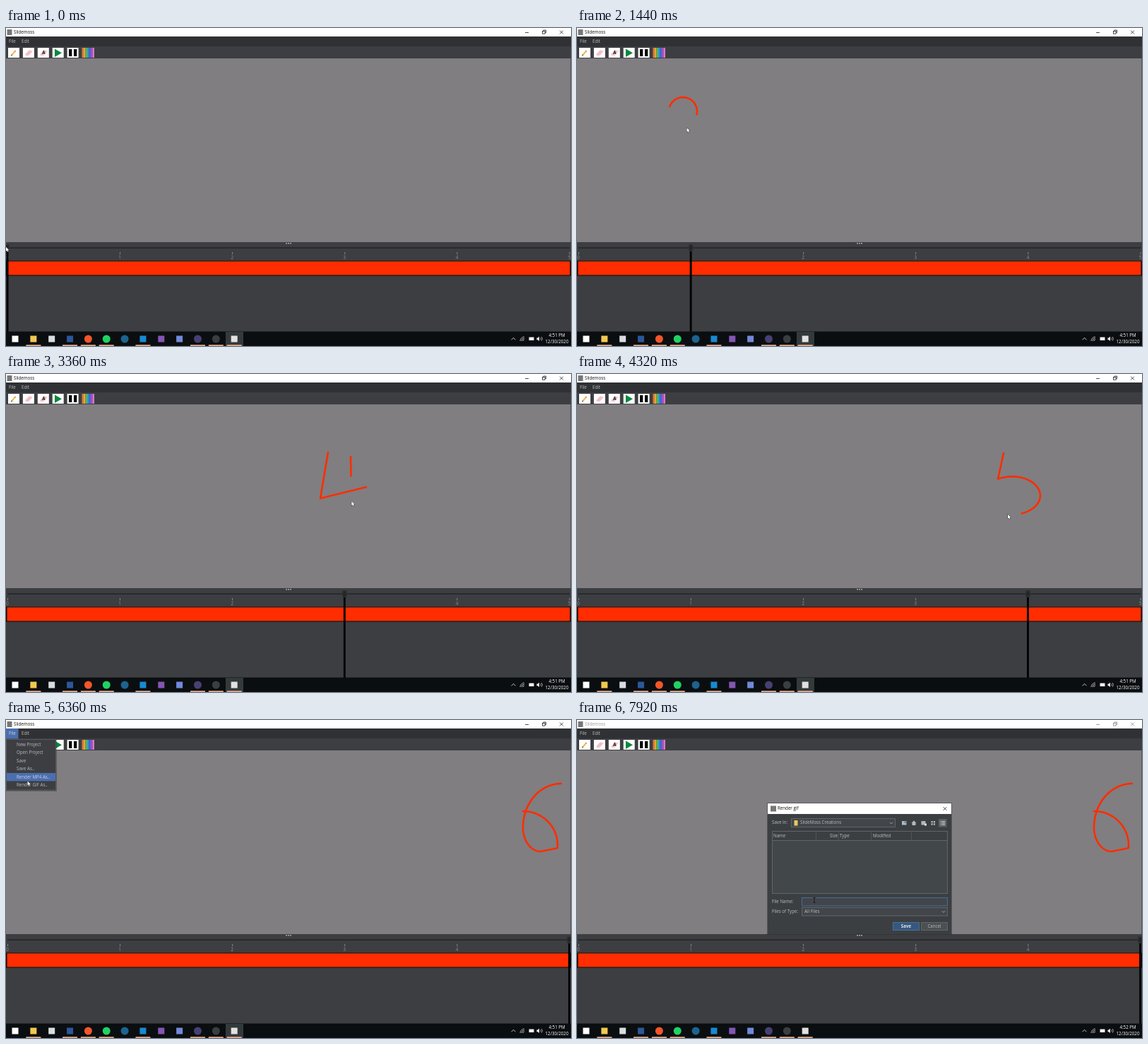
These frames come from a looping animation (800 by 450 pixels, 8 s). An HTML page with a canvas:

```html
<!DOCTYPE html>
<html lang="en">
<head>
<meta charset="utf-8">
<title>Timeline sketch</title>
<style>
html, body { margin: 0; width: 100%; height: 100%; overflow: hidden; background: #3c3e41; }
canvas { display: block; width: 800px; height: 450px; }
</style>
</head>
<body>
<canvas id="stage" width="800" height="450"></canvas>
<script>
const g = document.getElementById('stage').getContext('2d');
const LOOP = 8000, STEP = 120;
const LEAD = 40, LIFT = 100, REACH = 200, DRAG = 170;
const MENU_OPEN = 5980, DIALOG_OPEN = 6600, CLOCK_TURN = 7200, IN_FIELD = 7500;
const RED = '#ff2d00', PANEL = '#3c3e41', FIELD = '#42464a', EDGE = '#626568';
const INK = '#bbbcbe', BLUE = '#4b6eaf', ICON = '#b4b7ba';

// ---------- drawing helpers ----------
function box(x, y, w, h, fill) {
  g.fillStyle = fill;
  g.fillRect(x, y, w, h);
}
function panel(x, y, w, h, fill, edge = EDGE) {
  box(x, y, w, h, fill);
  g.strokeStyle = edge;
  g.lineWidth = 1;
  g.strokeRect(x + .5, y + .5, w - 1, h - 1);
}
function disc(x, y, r, fill) {
  g.fillStyle = fill;
  g.beginPath();
  g.arc(x, y, r, 0, Math.PI * 2);
  g.fill();
}
function ring(x, y, r, from, to, color) {
  g.strokeStyle = color;
  g.lineWidth = .8;
  g.beginPath();
  g.arc(x, y, r, from, to);
  g.stroke();
}
function poly(points, fill) {
  g.fillStyle = fill;
  g.beginPath();
  points.forEach(p => g.lineTo(...p));
  g.closePath();
  g.fill();
}
function line(points, color, width = .8) {
  g.strokeStyle = color;
  g.lineWidth = width;
  g.beginPath();
  points.forEach(p => g.lineTo(...p));
  g.stroke();
}
function text(s, x, y, color = INK, align = 'left', weight = 400) {
  g.font = `${weight} 6.2px "Open Sans", "Noto Sans", sans-serif`;
  g.textAlign = align;
  g.textBaseline = 'middle';
  g.fillStyle = color;
  g.fillText(s, x, y);
}
function cross(x, y, color) {
  for (const s of [-1, 1]) line([[x - 2.4, y - 2.4 * s], [x + 2.4, y + 2.4 * s]], color);
}
const chevron = (x, y, color, r = 2, dir = 1) =>
  line([[x - r, y - dir], [x, y + dir], [x + r, y - dir]], color);

// ---------- pen strokes ----------
const clamp = v => Math.max(0, Math.min(1, v));
const smooth = v => v * v * (3 - 2 * v);
const mix = (a, b, k) => a + (b - a) * k;
const mixPoint = (p, q, k) => [mix(p[0], q[0], k), mix(p[1], q[1], k)];
const dist = (p, q) => Math.hypot(q[0] - p[0], q[1] - p[1]);
const lengthOf = pts => pts.reduce((n, p, i) => n + (i ? dist(pts[i - 1], p) : 0), 0);

// Elliptic arc, angles in degrees
function arc(cx, cy, rx, ry, from, to) {
  return Array.from({ length: 25 }, (_, i) => {
    const a = mix(from, to, i / 24) * Math.PI / 180;
    return [cx + rx * Math.cos(a), cy + ry * Math.sin(a)];
  });
}

// The first part of a polyline, up to the given length
function cut(pts, left) {
  const out = [pts[0]];
  for (let i = 1; i < pts.length; i++) {
    const l = dist(pts[i - 1], pts[i]);
    if (l >= left) return [...out, mixPoint(pts[i - 1], pts[i], l ? left / l : 0)];
    out.push(pts[i]);
    left -= l;
  }
  return out;
}

// One digit per second of the timeline; speed in px per ms
const digits = [
  { start: 520, speed: .293, runs: [[[14, 98], [12, 186]]] },
  { start: 1340, speed: .6, runs: [[...arc(150, 118, 20, 20, 200, 400), [130, 168], [178, 164]]] },
  { start: 2142, speed: .4, runs: [[[289, 114], [296, 112],
    ...arc(312, 126, 22, 14, -90, 90), ...arc(312, 163, 30, 23, -90, 120)]] },
  { start: 3082, speed: .9, runs: [[[456, 111], [445, 176], [510, 160]], [[488, 117], [490, 215]]] },
  { start: 4020, speed: .5, runs: [[[604, 112], ...arc(616, 172, 40, 27, -120, 120)], [[604, 112], [664, 104]]] },
  { start: 5340, speed: .65, runs: [[...arc(786, 152, 54, 62, -90, -180),
    ...arc(757, 152, 25, 34, 180, 90), ...arc(732, 177, 49, 48, 5, -90)]] }
];

const headX = sec => 2 + sec * 159.1;
const strokes = [], drags = [];
const path = [
  [0, 0, 310], [5280, 795, 91], [5940, 8, 19], [6360, 30.5, 86.5],
  [6620, 31, 92], [6840, 125, 132], [7560, 336, 255], [LOOP, 336, 255]
];
digits.forEach(({ start, speed, runs }, sec) => {
  let t = start;
  for (const pts of runs) {
    const end = t + lengthOf(pts) / speed;
    strokes.push({ sec, pts, speed, start: t, end });
    path.push([t - LEAD, ...pts[0]], [end - LEAD, ...pts[pts.length - 1]]);
    t = end + LIFT;
  }
  if (sec < digits.length - 1) {
    const grab = t - LIFT + REACH;
    drags.push(grab);
    path.push([grab, headX(sec), 311], [grab + DRAG, headX(sec + 1), 311]);
  }
});
path.sort((a, b) => a[0] - b[0]);

const inkOf = (s, t) => cut(s.pts, (t - s.start) * s.speed);
const headAt = t => drags.reduce((n, grab) => n + smooth(clamp((t - grab) / DRAG)), 0);

function pointer(t) {
  const s = strokes.find(s => t + LEAD >= s.start && t + LEAD < s.end);
  if (s) return inkOf(s, t + LEAD).pop();
  const i = path.findIndex(p => p[0] > t);
  const [a, b] = [path[i - 1], path[i]];
  return mixPoint(a.slice(1), b.slice(1), smooth((t - a[0]) / (b[0] - a[0])));
}

// ---------- window ----------
function windowFrame(modal) {
  const c = modal ? '#888' : '#222';
  box(0, 0, 800, 12, '#fff');
  box(1.5, 2, 7, 8, '#777');
  text('Slidemoss', 11, 6.2, modal ? '#999' : '#111');
  line([[735, 6.5], [740, 6.5]], c);
  g.strokeRect(759.5, 4.5, 3.6, 3.6);
  line([[761, 4.5], [761, 3], [764.6, 3], [764.6, 6.7], [763.1, 6.7]], c);
  cross(786.5, 6, c);
  box(0, 12, 800, 14, '#303134');
  box(0, 26, 800, 17, PANEL);
  text('File', 4, 19.3);
  text('Edit', 22, 19.3);
}

function eraser(x) {
  poly([[x, 37], [x + 6, 31], [x + 11, 32.5], [x + 5, 39.5], [x + 1, 39]], '#f8d3d8');
  for (let i = 0; i < 3; i++) {
    line([[x + 1 + i * 2, 38.5 - i * .4], [x + 6 + i * 1.7, 32 + i * .4]], '#e7a0ab', .7);
  }
}

function toolbar() {
  for (let i = 0; i < 5; i++) box(3 + i * 20.9, 28, 16, 14, '#fff');
  line([[8.3, 38], [13, 32.6]], '#f2bd35', 2);
  line([[12.4, 33.2], [13.5, 32]], '#e58a86', 2);
  poly([[7, 39.5], [7.6, 37.3], [9, 38.7]], '#333');
  eraser(27);
  eraser(48);
  text('A', 53.5, 35.3, '#111', 'center', 700);
  poly([[69, 29.5], [79, 35.2], [69, 41]], '#07893e');
  for (const x of [89, 96]) box(x, 30, 4.3, 10, '#000');
  ['#d97a35', '#e9a53a', '#58b649', '#2f9bd8', '#4865d3', '#a04fc9', '#dd75c8']
    .forEach((c, i) => box(107.5 + i * 2.5, 28, 2.5, 14, c));
}

function drawing(t, sec) {
  box(0, 43, 800, 260.5, '#807e80');
  g.lineCap = g.lineJoin = 'round';
  for (const s of strokes) {
    if (t >= s.start && Math.abs(sec - s.sec) < .02) line(inkOf(s, t), RED, 2.6);
  }
  g.lineCap = 'butt';
  g.lineJoin = 'miter';
  box(799, 43, 1, 261, '#55565a');
}

function timeline(sec) {
  box(0, 303, 800, 127, PANEL);
  for (let i = -1; i < 2; i++) box(399.3 + i * 3, 304, 1.6, 1.5, '#c4c5c7');
  box(2, 310.5, 796, 1.2, '#1d1e20');
  for (let i = 0; i < 6; i++) {
    box(headX(i), 317, .9, 3.5, '#8b8d90');
    text(String(i), headX(i), 325, '#8f9194', 'center');
  }
  box(0, 329.5, 800, 21, '#090909');
  box(1.5, 330.3, 797, 19.2, RED);
  const x = headX(sec);
  panel(x - 3, 306.5, 6, 9, '#242527', '#323437');
  box(x - 1.4, 316, 2.9, 114, '#030303');
}

function taskbar(t, modal) {
  box(0, 429.5, 800, 20.5, '#0b0e10');
  if (!modal) box(311, 430, 25, 20, '#333a3c');
  const apps = ['#fff', '#f2c94f', '#d8dde0', '#2b579a', '#f4552b', '#1fd361', '#1d638f',
    '#188ad3', '#8355b4', '#7289da', '#474074', '#3b3e41', '#e3e1df'];
  const round = '0000111000110', open = '0101110100111';
  apps.forEach((color, i) => {
    const x = 13 + i * 25.85;
    if (+round[i]) disc(x, 440, 5.5, color);
    else box(x - 4.5, 435.5, 9, 9, color);
    if (+open[i]) box(x - 10.5, 448.3, 21, 1.7, '#e7ae91');
  });

  chevron(718.5, 439.8, '#eee', 3, -1.5);
  for (const r of [2, 4, 6]) ring(734, 443, r, Math.PI, Math.PI * 1.5, '#d5d5d5');
  box(740.5, 437.5, 7, 4.5, '#f2f2f2');
  poly([[751.5, 438.4], [753, 438.4], [755, 436.5], [755, 443], [753, 441.2], [751.5, 441.2]], '#eee');
  for (const r of [2, 4]) ring(755.3, 439.8, r, -.8, .8, '#ccc');
  text(t < CLOCK_TURN ? '4:51 PM' : '4:52 PM', 780, 435, '#fff', 'center');
  text('12/30/2020', 780, 444.4, '#fff', 'center');
}

function fileMenu(y) {
  const row = 11.45;
  box(0, 12, 17.5, 14.5, BLUE);
  text('File', 4, 19.3, '#c9d2e2');
  box(0, 27, 72, 74, 'rgba(0,0,0,.25)');
  panel(0, 27, 71, 72.5, PANEL, '#55575a');
  ['New Project', 'Open Project', 'Save', 'Save As..', 'Render MP4 As..', 'Render GIF As..'].forEach((s, i) => {
    const top = 29.2 + i * row;
    const on = y >= top && y < top + row;
    if (on) box(1, top, 69, row, BLUE);
    text(s, 15, top + 5.9, on ? '#c9d2e2' : INK);
  });
}

function dialogIcons() {
  box(460, 143, 6.5, 5.5, ICON);
  box(463.5, 143.5, 2.5, 2.5, '#3f8fd0');
  poly([[473.5, 146], [477, 142.2], [480.5, 146]], ICON);
  box(474.5, 146, 5, 3, ICON);
  box(487.5, 143, 6, 5.5, ICON);
  box(492, 146.5, 3, 3, '#d7d9da');
  box(512, 140, 11.5, 11.5, '#5b5f62');
  for (let i = 0; i < 4; i++) box(501.5 + i % 2 * 3.3, 143 + (i >> 1) * 3.3, 2.3, 2.3, ICON);
  for (let i = 0; i < 3; i++) {
    box(514.5, 143 + i * 2.3, 1.1, 1.1, '#d0d2d4');
    box(516.3, 143 + i * 2.3, 5, 1.1, '#d0d2d4');
  }
}

function dialog() {
  box(269, 117, 262, 187, 'rgba(0,0,0,.3)');
  box(270, 118, 260, 185.5, '#3c3f42');
  box(270, 118, 260, 15, '#fff');
  box(274, 121.5, 8, 8, '#777');
  text('Render gif', 284, 125.8, '#111');
  cross(521, 125.5, '#222');

  text('Save In:', 276, 145.8);
  panel(303, 139, 148, 13, FIELD);
  box(307.5, 142, 5, 7.5, '#e9c85d');
  text('SlideMoss Creations', 316, 145.8);
  chevron(445, 145.8, INK);
  dialogIcons();

  panel(276, 157, 249, 89, '#42484a');
  panel(276, 157, 249, 14, '#3c3f42');
  for (const x of [338, 370, 416, 473]) box(x, 159, .7, 11.5, '#5b5e61');
  text('Name', 278, 164.7);
  text('Size', 369.3, 164.7, INK, 'right');
  text('Type', 372, 164.7);
  text('Modified', 419, 164.7);

  text('File Name:', 276, 257.2);
  panel(318, 251, 207, 12.5, FIELD, '#466d94');
  text('Files of Type:', 276, 271.4);
  panel(318, 265, 207, 12.5, FIELD);
  text('All Files', 322, 271.4);
  chevron(519, 271.3, INK);

  panel(447, 286, 38, 12, '#365880', '#4c708c');
  text('Save', 466, 292, '#e1e4e8', 'center', 700);
  panel(487, 286, 38, 12, '#4c5052');
  text('Cancel', 506, 292, INK, 'center');
}

function arrow([x, y]) {
  const shape = [[0, 0], [0, 6], [1.4, 4.8], [2.4, 6.9], [3.4, 6.4], [2.5, 4.4], [4.3, 4.3]]
    .map(([a, b]) => [x + a, y + b]);
  line([...shape, shape[0]], '#111');
  poly(shape, '#fff');
}
function beam([x, y]) {
  line([[x, y - 3.5], [x, y + 3.5]], '#111');
  for (const d of [-3.5, 3.5]) line([[x - 1.5, y + d], [x + 1.5, y + d]], '#111');
}

function render(t) {
  const sec = headAt(t), modal = t >= DIALOG_OPEN, tip = pointer(t);
  windowFrame(modal);
  toolbar();
  drawing(t, sec);
  timeline(sec);
  taskbar(t, modal);
  if (modal) dialog();
  else if (t >= MENU_OPEN) fileMenu(pointer(t - LEAD)[1]);
  if (t >= IN_FIELD) beam(tip);
  else arrow(tip);
}

const start = performance.now();
function tick() {
  const t = (performance.now() - start) % LOOP;
  render(Math.floor(t / STEP) * STEP);
  requestAnimationFrame(tick);
}
tick();
</script>
</body>
</html>
```
